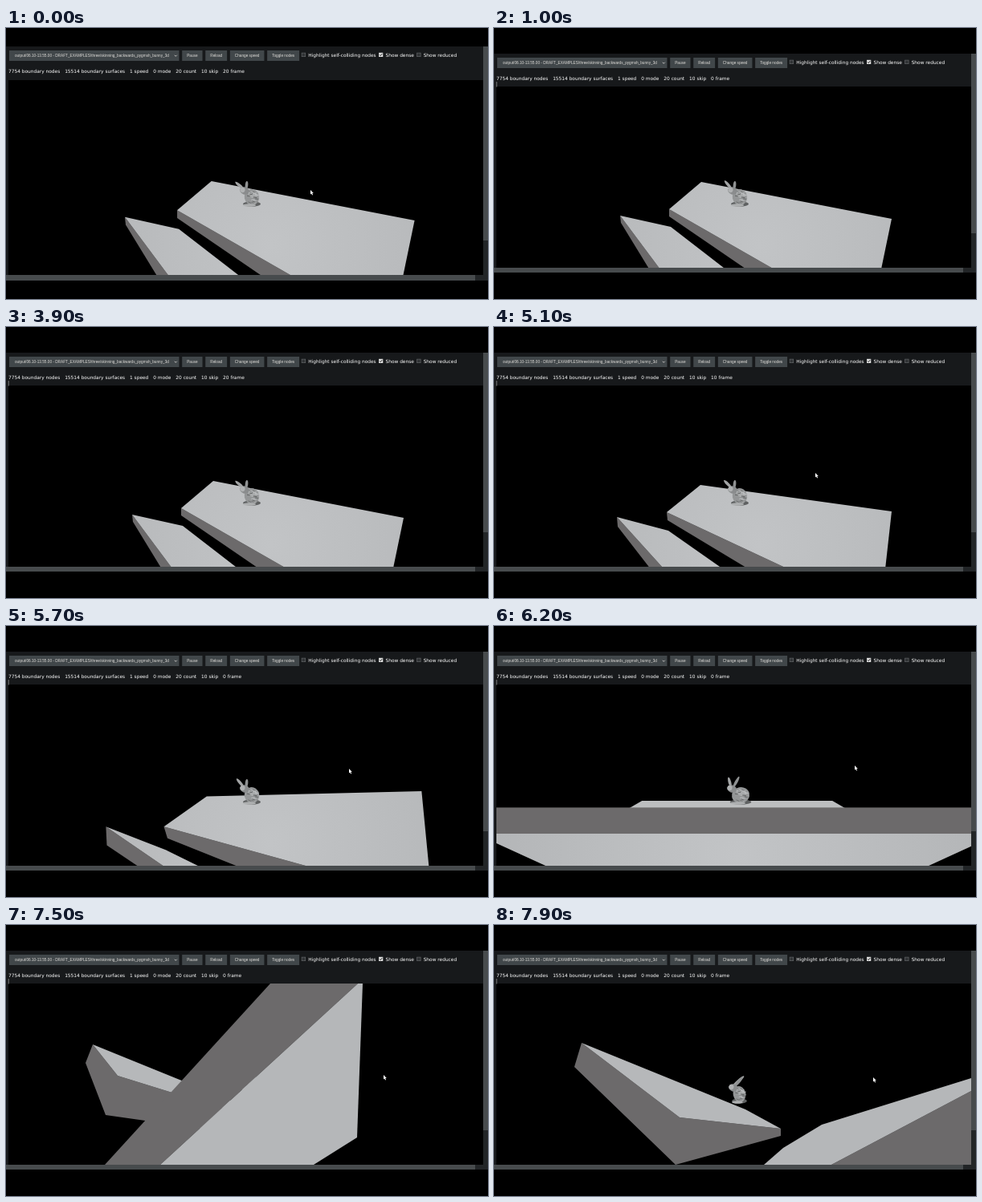
Write an HTML page with a canvas that moves like this. It is 600 px wide and 338 px high and loops after 8 s.

```html
<!DOCTYPE html>
<html lang="en">
<head>
<meta charset="utf-8">
<title>Skinning viewer</title>
<style>
html, body { margin: 0; width: 100%; height: 100%; overflow: hidden; background: #000; }
canvas { display: block; width: 600px; height: 338px; }
</style>
</head>
<body>
<canvas id="stage"></canvas>
<script>
const LOOP = 8000;
const canvas = document.getElementById('stage');
const ctx = canvas.getContext('2d');
const dpr = window.devicePixelRatio || 1;
canvas.width = 600 * dpr;
canvas.height = 338 * dpr;

const LABEL = '5.87px "DejaVu Sans", Verdana, sans-serif';
const BUTTON = '4.72px "Liberation Sans", Arial, sans-serif';
const DARK = '#6c6a6b';
const PIVOT = [292, 207];

function rect(x, y, w, h, color) {
  ctx.fillStyle = color;
  ctx.fillRect(x, y, w, h);
}

// draws a string and returns where it ends
function text(str, x, y, font, color) {
  ctx.font = font;
  ctx.fillStyle = color;
  ctx.fillText(str, x, y);
  return x + ctx.measureText(str).width;
}

function line(color, width, ...points) {
  ctx.beginPath();
  for (const p of points) ctx.lineTo(...p);
  ctx.strokeStyle = color;
  ctx.lineWidth = width;
  ctx.stroke();
}

function poly(fill, ...points) {
  ctx.beginPath();
  for (const p of points) ctx.lineTo(...p);
  ctx.closePath();
  ctx.fillStyle = fill;
  ctx.fill();
}

function trapezoid(fill, y0, half0, y1, half1, cx = 302.7) {
  poly(fill, [cx - half0, y0], [cx + half0, y0], [cx + half1, y1], [cx - half1, y1]);
}

function oval(fill, x, y, rx, ry, angle = 0) {
  ctx.beginPath();
  ctx.ellipse(x, y, rx, ry, angle, 0, Math.PI * 2);
  ctx.fillStyle = fill;
  ctx.fill();
}

function glow(x, y, r) {
  const g = ctx.createRadialGradient(x, y, 0, x, y, r);
  g.addColorStop(0, '#c2c4c6');
  g.addColorStop(1, '#b4b6b8');
  return g;
}

function randomizer(seed) {
  return () => (seed = (seed * 16807) % 2147483647) / 2147483647;
}

function ear(x, y, angle, length, color) {
  oval(color, x + Math.sin(angle) * length / 2, y - Math.cos(angle) * length / 2, 1.8, length / 2, angle);
}

// x: head centre, span: body width, lean: angles of the two ears
function bunny(x, span, lean, size) {
  const mid = x + span * 0.5;
  ear(x, 201, lean[0], size[0], '#a2a4a5');
  ear(x + 3, 201, lean[1], size[1], '#8f9192');
  oval('#5f6162', mid, 219.5, span * 0.55, 3.2);
  oval('#949697', mid, 211, span * 0.46, 10, -0.2);
  oval('#8a8c8d', x + 1, 203, 6, 4.6, 0.3);
  oval('#b0b2b3', x - 1.5, 202, 3, 3.2, 0.3);
  oval('#a9abac', mid + 1, 208, span * 0.28, 4, 0.4);
  oval('#aeb0b1', mid - span * 0.15, 221, span * 0.4, 1.7);

  // uneven surface
  const rnd = randomizer(71);
  for (let i = 0; i < 26; i++) {
    const a = rnd() * Math.PI * 2, r = Math.sqrt(rnd()) * 0.85;
    const px = mid + Math.cos(a) * r * span * 0.42, py = 211 + Math.sin(a) * r * 9;
    line(i % 2 ? 'rgba(205,207,208,.55)' : 'rgba(70,72,73,.55)', 0.9, [px, py], [px + 3 + rnd() * 2, py + rnd() * 3 - 1]);
  }
}

// corners are [x, y, dx, dy]: a place and how far it moves as k goes from 0 to 1
const move = (k, corners) => corners.map(([x, y, dx, dy]) => [x + k * dx, y + k * dy]);

function slab(k, zoom, side, top) {
  const place = rows => move(k, rows).map(p => p.map((v, i) => PIVOT[i] + (v - PIVOT[i]) * zoom));
  poly(DARK, ...place(side));
  poly(glow(330, 270, 260), ...place(top));
}

function oblique(zoom, tilt) {
  const left = [218, 226, -3, 5], front = [382, 320, 23, 0];
  const tip = [157, 234, -4, 3], edge = [221, 320, 7, 0];
  return frame => {
    slab(tilt, zoom, [left, front, [342, 320, 5, 0], [218, 235, -2, 6]],
      [left, [258, 192, -1, 5], [495, 238, 0, -8], [478, 320, 7, 0], front]);
    slab(tilt, zoom, [tip, edge, [205, 320, 4, 0], [158, 243, -4, 6]],
      [tip, [220, 248, -3, 6], [313, 320, -2, 0], edge]);
    bunny(296, 20, [-0.7 - frame * 0.008, 0.1], [14, 10]);
  };
}

function level() {
  trapezoid('#bcbebf', 218, 118.5, 227, 134);
  bunny(295, 24, [-0.25, 0.5], [13, 15]);
  rect(3, 226.4, 591, 33, DARK);
  trapezoid(glow(302, 285, 300), 259, 326, 299, 238.5);
}

function below() {
  const tip = [480, 261], far = [3, 121];
  poly(DARK, [3, 73], [120, 73], [476, 247], tip, far);
  poly(glow(160, 190, 260), far, tip, [418, 299], [3, 299]);
}

function swing(k) {
  const tip = [108, 149, 1, -2], fold = [139, 188, 92, 52], end = [300, 238, 57, 16];
  return () => {
    poly(DARK, ...move(k, [tip, fold, end, [300, 262, 57, 1], [124, 237, 102, 62], [99, 172, 1, 5]]));
    poly('#b6b8ba', ...move(k, [tip, [280, 219, 33, 11], end, fold]));
    bunny(297, 17, [0.85, 0.7], [19, 15]);
    poly(DARK, ...move(k, [[123, 299, 297, 0], [329, 73, 265, 134], [438, 73, 156, 226], [192, 299, 228, 0]]));
    poly('#b5b7b9', ...move(k, [[192, 299, 144, 0], [315, 186, 45, 92], [438, 73, -30, 176],
      [444, 73, 150, 118], [437, 265, 157, -58], [383, 299, 37, 0]]));
  };
}

// start time, view, pointer tip
const SHOTS = [
  [0, oblique(1.067, 0), [379, 202]],
  [500, oblique(1, 0)],
  [4300, oblique(1, 0), [379, 198]],
  [5100, oblique(1, 1), [400, 182]],
  [5700, oblique(1.11, 4), [427, 178]],
  [6200, level, [449, 174]],
  [6900, below, [461, 176]],
  [7500, swing(0), [470, 187]],
  [7700, swing(0.85), [472, 189]],
  [7900, swing(1), [472, 190]]
];

// the simulation steps forward to 20 and back again
function frameAt(t) {
  if (t < 500) return 20;
  const step = Math.min(4, Math.floor((t + 60) / 1440));
  return 10 * (2 - Math.abs(2 - step));
}

function button(x, y, label, width) {
  const end = text(label, x + 6, y + 8.2, BUTTON, '#e0deda');
  const w = width || end + 6 - x;
  rect(x, y, w, 13, '#41474a');
  text(label, x + (width ? 7 : 6), y + 8.2, BUTTON, '#e0deda');
  return x + w + 3.7;
}

function checkbox(x, y, label, on) {
  rect(x, y - 2.6, 5.2, 5.2, on ? '#e0e0e0' : '#66696b');
  if (on) line('#1b1d1e', 0.9, [x + 1, y], [x + 2.2, y + 1.3], [x + 4.3, y - 1.5]);
  else rect(x + 0.6, y - 2, 4, 4, '#303335');
  return text(label, x + 8.4, y + 2.9, LABEL, '#fff') + 3.4;
}

function toolbar(y, frame) {
  let x = button(4, y + 5, 'output/06.10-13.55.00 - DRAFT_EXAMPLES/three/skinning_backwards_pygmsh_bunny_3d', 211.5);
  line('#e0deda', 0.8, [209.8, y + 10.8], [211.3, y + 12.3], [212.8, y + 10.8]);
  for (const label of ['Pause', 'Reload', 'Change speed', 'Toggle nodes']) x = button(x, y + 5, label);

  x = 367.8;
  for (const label of ['Highlight self-colliding nodes', 'Show dense', 'Show reduced'])
    x = checkbox(x, y + 10.4, label, label === 'Show dense');

  x = 3;
  for (const label of ['7754 boundary nodes', '15514 boundary surfaces', '1 speed', '0 mode', '20 count', '10 skip', frame + ' frame'])
    x = text(label, x, y + 33.2, LABEL, '#fff') + 5.9;
}

function cursor(x, y) {
  poly('#fff', [x, y], [x, y + 5.4], [x + 1.2, y + 4.4], [x + 2.2, y + 6.4],
    [x + 3.1, y + 6], [x + 2.2, y + 4], [x + 3.8, y + 3.9]);
}

function draw(t) {
  const tall = t < 500;
  const top = tall ? 23 : 32;
  const view = tall ? 65 : 73;
  const base = tall ? 308 : 299;
  const end = tall ? 315 : 305;
  const frame = frameAt(t);
  const [, scene, tip] = SHOTS.findLast(shot => t >= shot[0]);

  ctx.setTransform(dpr, 0, 0, dpr, 0, 0);
  rect(0, 0, 600, 338, '#000');
  rect(0, top, 600, end - top, '#17191b');
  toolbar(top, frame);

  ctx.save();
  ctx.beginPath();
  ctx.rect(3, view, 591, base - view);
  ctx.clip();
  rect(3, view, 591, base - view, '#000');
  scene(frame);
  ctx.restore();
  if (!tall) rect(2.8, 67, 0.7, 6.5, '#a5a5a5');

  rect(594, top, 6, end - top, '#222527');
  rect(594, top, 6, (tall ? 265 : 256) - top, '#474b4d');
  rect(0, base, 600, end - base, '#222527');
  rect(0, base, 584, end - base, '#474b4d');
  if (tip) cursor(...tip);
}

const begin = performance.now();
function tick() {
  draw((performance.now() - begin) % LOOP);
  requestAnimationFrame(tick);
}
tick();
</script>
</body>
</html>
```
